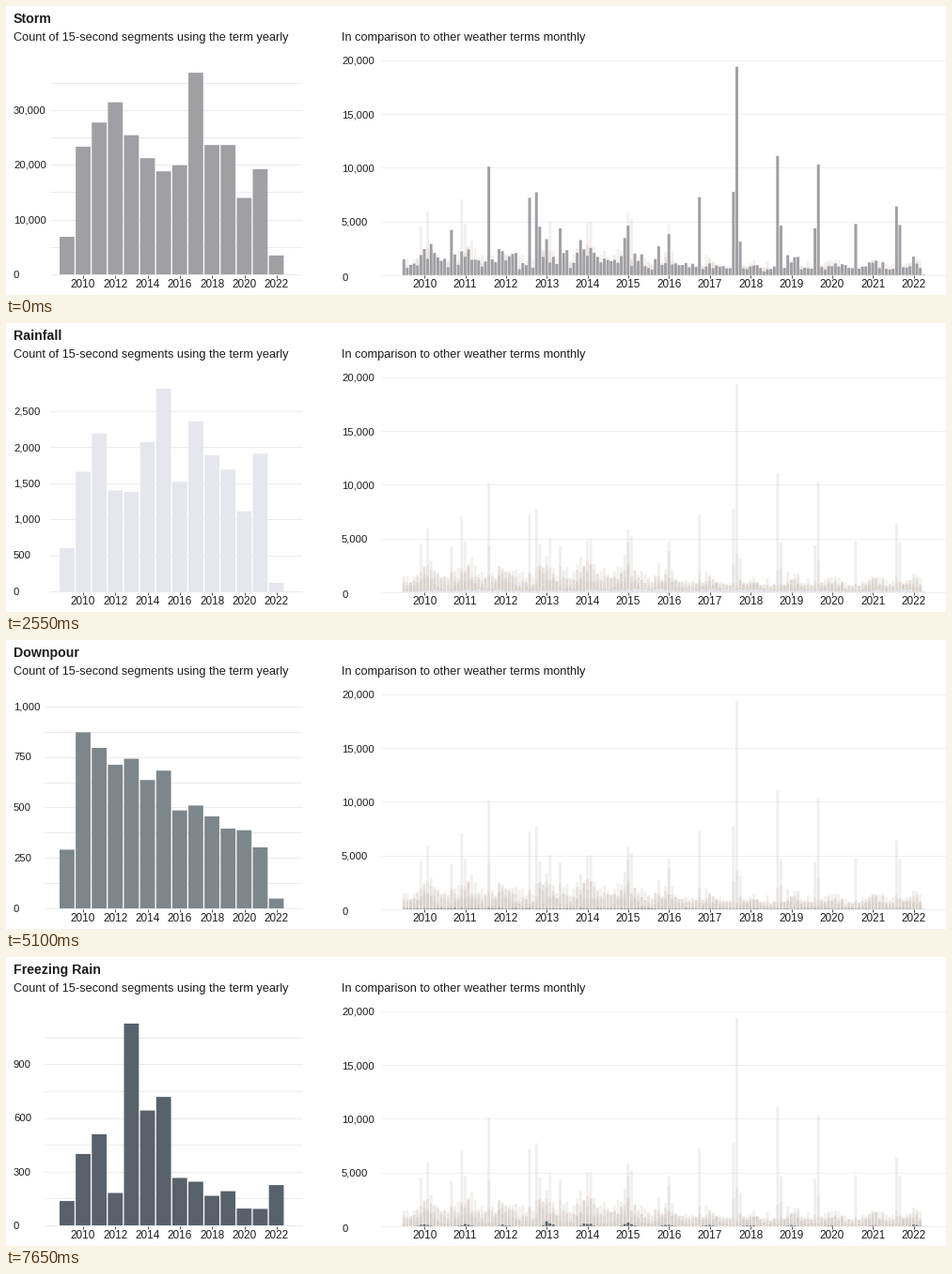
These frames come from a looping animation (1000x308 px, 8 s). A matplotlib script:

```python
import matplotlib.pyplot as plt
import numpy as np
from matplotlib.animation import FuncAnimation
from matplotlib.collections import LineCollection, PolyCollection

WIDTH, HEIGHT, DPI = 1000, 308, 100
LOOP_MS, HOLD_MS, STEP_MS = 8000, 850, 50
PX = 72 / DPI
INK = "#1c1c1c"
BASE = 286
MONTH_BASE, MONTH_SCALE = 286.7, 57.2 / 5000
MONTH_X, MONTH_STEP = 423.3, 3.614

rng = np.random.default_rng(11)
months = np.arange(154)          # July 2009 to April 2022
year_of = (months + 6) // 12
season = 0.5 + 0.5 * np.cos(2 * np.pi * (months - 6) / 12)   # 1 in January


def declining(peak):
    """Yearly counts that fall off, with a part year at either end."""
    counts = peak * np.linspace(1, 0.35, 14) * rng.uniform(0.7, 1, 14)
    counts[[0, -1]] *= 0.4, 0.15
    return counts


# title, colour, label step and its pixels, grid lines per label, yearly counts
TERMS = [
    ("Storm", "#9f9fa4", 10000, 58.4, 2,
     [6850, 23300, 27700, 31400, 25400, 21200, 18800, 19900, 36800, 23600,
      23600, 13950, 19200, 3450]),
    ("Weather", "#c1bbb8", 5000, 42.4, 1,
     [7350, 22050, 24350, 19500, 21750, 25550, 18750, 12050, 11250, 9350,
      11850, 9650, 13250, 3750]),
    ("Rain", "#cfd4d8", 5000, 63.6, 2,
     [5000, 13100, 16900, 13800, 14800, 13300, 13600, 9750, 13100, 11200,
      11000, 6800, 8650, 1380]),
    ("Rainfall", "#e6e7ed", 500, 38.4, 1,
     [600, 1660, 2190, 1400, 1380, 2070, 2810, 1520, 2360, 1890, 1690, 1110,
      1910, 120]),
    ("Drizzle", "#cbcdd0", 100, 84.3, 2, declining(255)),
    ("Rain Shower", "#b1b1b1", 100, 84.3, 2,
     [193, 177, 256, 228, 208, 173, 178, 68, 87, 81, 39, 28, 58, 4]),
    ("Downpour", "#7d868b", 250, 53.8, 2, declining(980)),
    ("Thunderstorm", "#3b484f", 250, 53.8, 2,
     [211, 552, 988, 752, 735, 995, 640, 318, 244, 179, 327, 181, 264, 46]),
    ("Hail", "#49555c", 300, 57.2, 2, declining(1100)),
    ("Freezing Rain", "#58616a", 300, 57.2, 2,
     [136, 399, 509, 181, 1128, 642, 718, 265, 244, 165, 191, 94, 92, 225]),
]

# Month index and count of the spikes that stand out.
STORM_EVENTS = {14: 4200, 25: 10100, 37: 7200, 39: 7700, 40: 4500, 46: 4350,
                66: 4600, 78: 3800, 87: 7250, 97: 7750, 98: 19400, 99: 3100,
                110: 11100, 111: 4600, 121: 4350, 122: 10300, 133: 4750,
                145: 6400, 146: 4650}
WINTER_EVENTS = {5: 4500, 7: 5900, 17: 7050, 18: 4700, 43: 5000, 54: 4900,
                 55: 5000, 66: 5800, 67: 5200, 78: 4700}


def spikes(events):
    heights = np.zeros(len(months))
    heights[list(events)] = list(events.values())
    return heights


def noise(spread):
    return np.exp(rng.normal(0, spread, len(months)))


def split_years(yearly, weights, events=0):
    """Share each yearly total, less its events, over its months by weight."""
    known = np.zeros(len(months)) + events
    weights = np.where(known > 0, 0, weights)
    weights[-1] *= 0.05
    left = np.maximum(yearly - np.bincount(year_of, known), 0)
    return known + (left / np.bincount(year_of, weights))[year_of] * weights


def bars(lefts, heights, width, base, color, **style):
    boxes = [[(x, base), (x, base - h), (x + width, base - h), (x + width, base)]
             for x, h in zip(lefts, heights)]
    return ax.add_collection(
        PolyCollection(boxes, facecolors=color, linewidths=0, snap=False, **style))


def month_bars(counts, color, **style):
    lefts = MONTH_X + MONTH_STEP * months - 1.45
    return bars(lefts, counts * MONTH_SCALE, 2.9, MONTH_BASE, color, **style)


def lines(segments, color, **style):
    return ax.add_collection(
        LineCollection(segments, colors=color, linewidths=PX, **style))


def label(x, y, text, size, **style):
    return ax.text(x, y, text, fontsize=size * PX, color=INK, va="baseline", **style)


def year_axis(first_x, spacing, years):
    for i, year in enumerate(years):
        x = first_x + spacing * i
        label(x, 300.5, str(year), 11.7, ha="center")
        lines([[(x, 287), (x, 290)]], "#555555", zorder=4)


def build_static():
    label(8, 36.5, "Count of 15-second segments using the term yearly", 12.7)
    label(357, 36.5, "In comparison to other weather terms monthly", 12.7)
    for count in range(0, 20001, 5000):
        y = MONTH_BASE - count * MONTH_SCALE
        label(357, y + (4 if count else 6.5), f"{count:,}", 11.2)
        lines([[(399, y), (1000, y)]], "#f1f1f1", zorder=0)
    year_axis(82, 34.33, range(2010, 2023, 2))
    year_axis(445.2, 43.37, range(2010, 2023))


def build_slide(term, counts):
    title, color, step, step_px, grid_per_label, yearly = term
    parts = [label(8, 18, title, 14.1, weight="bold")]
    for i, y in enumerate(np.arange(BASE, 60, -step_px)):
        # The weather axis repeats "15,000" on its lowest step.
        value = 15000 if title == "Weather" and i == 1 else i * step
        parts.append(label(8, y + 3.8, f"{value:,}", 11.2))
    start = 47 if step > 300 else 41
    grid = [[(start, y), (315, y)]
            for y in np.arange(BASE, 60, -step_px / grid_per_label)]
    parts.append(lines(grid, "#ececec", zorder=0))
    first_x = 68 if title == "Rain Shower" else 57
    lefts = first_x + 17.13 * np.arange(len(yearly))
    heights = np.array(yearly) * step_px / step
    parts.append(bars(lefts, heights, 15.8, BASE, color, zorder=2))
    parts.append(month_bars(counts, color, zorder=3))
    return parts


plt.rcParams["font.family"] = "Liberation Sans"
fig = plt.figure(figsize=(WIDTH / DPI, HEIGHT / DPI), dpi=DPI, facecolor="white")
ax = fig.add_axes([0, 0, 1, 1])
ax.set(xlim=(0, WIDTH), ylim=(HEIGHT, 0))
ax.axis("off")

storm_events = spikes(STORM_EVENTS)
weights = {
    "Storm": (0.7 + 0.6 * season) * noise(0.35),
    "Weather": (0.8 + 0.5 * season) * noise(0.2),
    "Rain": (1 + storm_events / 4000) * noise(0.2),
    "Thunderstorm": (1.1 - season) * noise(0.5),
    "Freezing Rain": season ** 6 * noise(0.3) + 0.01,
}
monthly = [split_years(term[-1], weights.get(term[0], noise(0.25)),
                       storm_events if term[0] == "Storm" else 0)
           for term in TERMS]
fade = np.interp(months, [0, 70, 90, 153], [1, 1, 0.6, 0.6])
winter = np.maximum((300 + 1900 * season ** 2) * fade * noise(0.25),
                    spikes(WINTER_EVENTS))
winter[-1] = 50

build_static()
pale_layers = zip([monthly[0], winter, *monthly[1:4]],
                  ["#9c9895", "#b9a9a0", "#b8a698", "#baaa9f", "#bab0aa"],
                  [0.15, 0.17, 0.17, 0.15, 0.12])
for counts, color, alpha in pale_layers:
    month_bars(counts, color, alpha=alpha, zorder=1)
slides = [build_slide(term, counts) for term, counts in zip(TERMS, monthly)]


def update(frame):
    current = frame * STEP_MS // HOLD_MS
    for index, parts in enumerate(slides):
        for part in parts:
            part.set_visible(index == current)
    return []


animation = FuncAnimation(fig, update, frames=LOOP_MS // STEP_MS, interval=STEP_MS,
                          init_func=lambda: update(0), repeat=True, repeat_delay=0)
plt.show()
```
